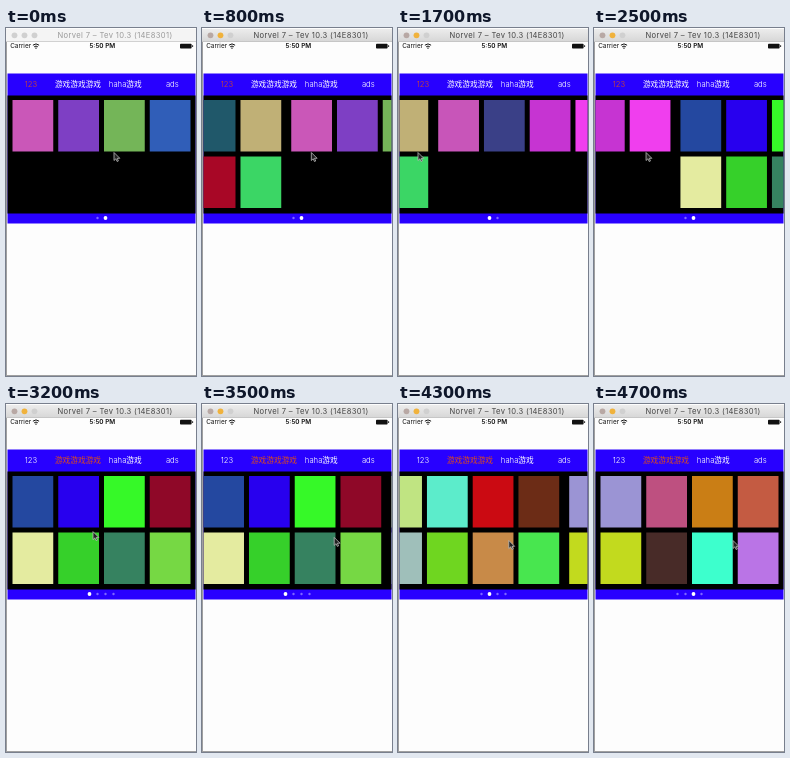
An HTML page for the animation above (5.1 s loop, 190x348 px).

```html
<!DOCTYPE html>
<html lang="en">
<head>
<meta charset="utf-8">
<title>Paged colour grid</title>
<style>
  html, body { margin: 0; width: 100%; height: 100%; overflow: hidden; background: #fdfdfd; }
  svg { display: block; width: 190px; height: 348px; }
  text { font-family: Inter, "Liberation Sans", sans-serif; text-anchor: middle; }
  .title { font-size: 7.6px; letter-spacing: .35px; fill: #999; }
  .status { font-size: 6.4px; fill: #111; }
  .tab { font: 300 7.7px Inter, "Noto Sans CJK SC", "Noto Sans CJK", sans-serif; fill: #fff; }
  .tab.on { fill: #dc4c1c; }
  .dot { fill: #fff; fill-opacity: .4; }
  .dot.on { fill-opacity: 1; }
  .chrome { fill: #f4f4f4; }
  .light { fill: #d0d0d0; }
  .focus .chrome { fill: url(#chrome); }
  .focus .title { fill: #444; }
  .focus .close { fill: #b8a8a4; }
  .focus .shrink { fill: #f0b23c; }
</style>
</head>
<body>
<svg id="stage" viewBox="0 0 190 348">
  <defs>
    <linearGradient id="chrome" x2="0" y2="1">
      <stop stop-color="#ececec"/><stop offset="1" stop-color="#d6d6d6"/>
    </linearGradient>
    <clipPath id="view"><rect x="1.5" y="67.5" width="188" height="118"/></clipPath>
  </defs>
  <rect width="190" height="348" fill="#fdfdfd"/>

  <rect class="chrome" y="1" width="190" height="13"/>
  <rect y="13.4" width="190" height=".6" fill="#bbb"/>
  <circle class="light close" cx="8.5" cy="7.3" r="2.9"/>
  <circle class="light shrink" cx="18.5" cy="7.3" r="2.9"/>
  <circle class="light" cx="28.5" cy="7.3" r="2.9"/>
  <text class="title" x="109" y="10.1">Norvel 7 – Tev 10.3 (14E8301)</text>

  <text class="status" x="14.6" y="20.4">Carrier</text>
  <g fill="none" stroke="#111">
    <path d="M26.9 17.2q3.1-2.6 6.2 0M28.2 18.8q1.8-1.5 3.6 0"/>
    <circle cx="30" cy="20.1" r=".3"/>
  </g>
  <text class="status" x="96.3" y="20.4" font-weight="600">5:50 PM</text>
  <rect x="174" y="15.7" width="11.6" height="4.8" rx=".8" fill="#111"/>
  <rect x="186.2" y="17.2" width=".9" height="1.8" fill="#111"/>

  <rect x="1.5" y="45.5" width="188" height="150" fill="#2800ff"/>
  <g id="tabs">
    <text class="tab" x="25" y="58.8">123</text>
    <text class="tab" x="72" y="58.8">游戏游戏游戏</text>
    <text class="tab" x="119.3" y="58.8">haha游戏</text>
    <text class="tab" x="166.3" y="58.8">ads</text>
  </g>
  <g clip-path="url(#view)">
    <rect y="67" width="190" height="119"/>
    <g id="strip"></g>
  </g>
  <g id="dots"></g>

  <rect y="14" width="1" height="334" fill="#a0a0a0"/>
  <rect y="347" width="190" height="1" fill="#a0a0a0"/>
  <path id="cursor" d="M0 0V8L1.9 6.3L3.1 9L4.4 8.5L3.2 5.8H5.8Z" fill="#222" stroke="#bbb" stroke-width=".8"/>
</svg>
<script>
const LOOP = 5100, STEP = 100, PAGE = 188, SWIPE = 500, DRAG = 365;
const $ = id => document.getElementById(id);

function add(parent, name, attrs) {
  const el = document.createElementNS('http://www.w3.org/2000/svg', name);
  for (const k in attrs) el.setAttribute(k, attrs[k]);
  return parent.appendChild(el);
}

const ease = u => {
  u = Math.min(1, Math.max(0, u));
  return u * u * (3 - 2 * u);
};

// Each page: four columns, filled row by row.
const pages = [
  '#8a5fd0 #d08a3c #20586a #c0b076 #3c9fb0 #b8a0d8 #a80726 #3bd665',
  '#ca57b8 #7e3fc4 #74b558 #305eb8',
  '#2448a0 #2800ee #36f928 #8f0828 #e4eba0 #36d02a #368260 #76d844',
  '#c0e482 #5ceccb #cb0a12 #6c2c16 #9fbfba #6fd620 #c88a48 #48e64f',
  '#9b94d4 #be5080 #ca7e15 #c45b42 #c2da1e #482b28 #3dffcd #ba74e6'
].map(s => s.split(' '));
const reused = ['#c855b9', '#3a4087', '#c634d2', '#f03eee'];

const cells = pages.map((colors, p) => colors.map((fill, i) => add($('strip'), 'rect', {
  x: 6.5 + p * PAGE + i % 4 * 45.75,
  y: 72 + (i >> 2) * 56.5,
  width: 40.75, height: 51.5, fill
})));

const dots = [0, 1, 2, 3].map(() => add($('dots'), 'circle', { cy: 190 }));

// The first swipe goes back a page, the others forward.
const swipes = [570, 1335, 2225, 3450, 4190].map((start, i) => ({ start, dir: i ? 1 : -1 }));

// The pointer runs from press to release in each swipe and drifts between them.
const path = [
  [0, 108], [3200, 87], [4700, 139],
  ...swipes.flatMap(({ start, dir }) => [
    [start, 95 + 55 * dir],
    [start + DRAG, 85 - 65 * dir]
  ])
].sort((a, b) => a[0] - b[0]);

function pointerX(t) {
  const i = path.findIndex(p => p[0] > t);
  if (i < 0) return path[path.length - 1][1];
  const [t0, x0] = path[i - 1], [t1, x1] = path[i];
  return x0 + (x1 - x0) * (t - t0) / (t1 - t0);
}

function draw(t) {
  const position = swipes.reduce((p, s) => p + s.dir * ease((t - s.start) / SWIPE), 1);
  const done = swipes.filter(s => t >= s.start + SWIPE);
  const page = done.reduce((p, s) => p + s.dir, 1);

  $('strip').setAttribute('transform', `translate(${-position * PAGE})`);
  const y = 124.5 + 12 * ease((t - 2900) / 900);
  $('cursor').setAttribute('transform', `translate(${pointerX(t)} ${y})`);
  $('stage').classList.toggle('focus', t >= 600);

  const colors = done.length ? reused : pages[1];
  cells[1].forEach((c, i) => c.setAttribute('fill', colors[i]));

  // Two pages belong to the first tab, the rest to the second.
  const tab = page < 2 ? 0 : 1;
  const count = tab ? 4 : 2, active = page - 2 * tab;
  [...$('tabs').children].forEach((el, i) => el.classList.toggle('on', i === tab));
  dots.forEach((d, i) => {
    d.setAttribute('class', i === active ? 'dot on' : 'dot');
    d.setAttribute('cx', 95.5 + (i - (count - 1) / 2) * 8);
    d.setAttribute('r', i >= count ? 0 : i === active ? 1.9 : 1.2);
  });
}

function tick() {
  const t = performance.now() % LOOP;
  draw(Math.floor(t / STEP) * STEP);
  requestAnimationFrame(tick);
}
tick();
</script>
</body>
</html>
```
